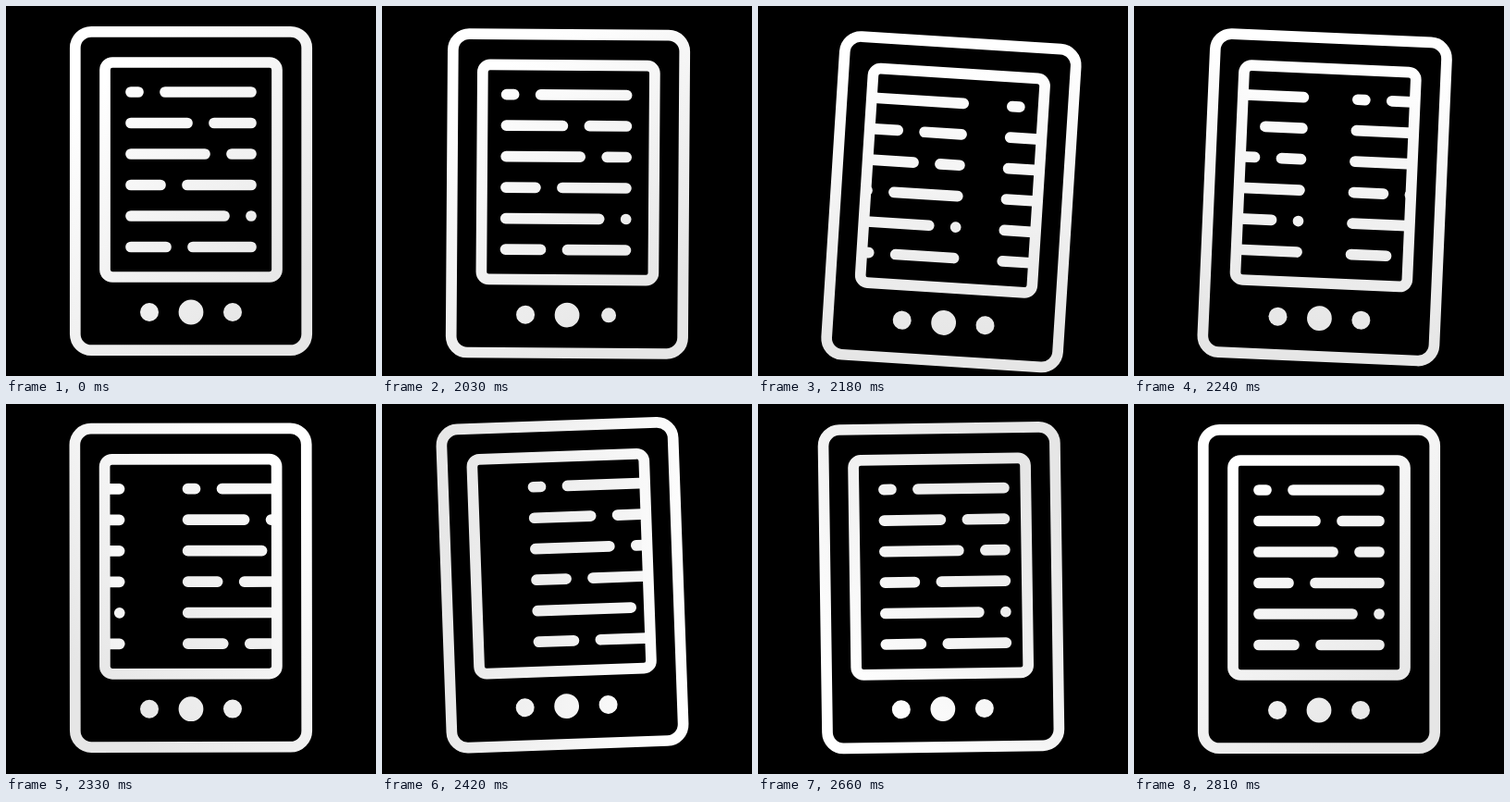
Write an HTML page that moves like this. It is 400 by 400 pixels and loops after 2840 ms.

```html
<!DOCTYPE html>
<html lang="en">
<head>
<meta charset="utf-8">
<title>E-reader page turn</title>
<style>
  html, body { margin: 0; width: 100%; height: 100%; overflow: hidden; background: #000; }
  svg { display: block; width: 100vw; height: 100vh; }
</style>
</head>
<body>
<svg viewBox="0 0 400 400">
  <defs>
    <linearGradient id="shade" gradientUnits="userSpaceOnUse" x1="50" y1="200" x2="350" y2="200">
      <stop offset="0" stop-color="#fff"/>
      <stop offset="1" stop-color="#e6e6e6"/>
    </linearGradient>
    <clipPath id="screen"><rect x="107" y="61" width="186" height="232"/></clipPath>
    <path id="text"/>
  </defs>
  <g id="device" fill="none" stroke="url(#shade)" stroke-width="11.7" stroke-linecap="round">
    <g clip-path="url(#screen)">
      <use id="oldPage" href="#text"/>
      <use id="newPage" href="#text"/>
    </g>
    <rect x="74.8" y="27.8" width="250.4" height="344.4" rx="17.5"/>
    <rect x="107" y="61" width="186" height="232" rx="8"/>
    <g fill="url(#shade)" stroke="none">
      <circle cx="155" cy="331" r="10"/>
      <circle cx="200" cy="331" r="13.4"/>
      <circle id="next" cx="245" cy="331" r="10"/>
    </g>
  </g>
</svg>
<script>
const LOOP = 2840, START = 2030, STEP = 30;
const $ = id => document.getElementById(id);

// Each row: end of its first dash, start of its second.
const rows = [[143, 172], [196, 225], [215, 244], [167, 196], [236, 265], [173, 202]];
$('text').setAttribute('d', rows.map(([a, b], i) => {
  const y = 93 + 33.5 * i;
  return `M135 ${y}H${a}M${b} ${y}H${b === 265 ? 265.01 : 265}`;
}).join(''));

function bezier(x1, x2) {
  // Timing curve whose handles are flat at both ends.
  return p => {
    let lo = 0, hi = 1;
    for (let i = 0; i < 24; i++) {
      const u = (lo + hi) / 2, v = 1 - u;
      if (3 * x1 * u * v * v + 3 * x2 * u * u * v + u * u * u < p) lo = u; else hi = u;
    }
    return lo * lo * (3 - 2 * lo);
  };
}
const smooth = p => p * p * (3 - 2 * p);
const linear = p => p;
const glide = bezier(0.207, 0.277);

function track(keys, ease = smooth) {
  return t => {
    if (t <= keys[0][0]) return keys[0][1];
    for (let i = 1; i < keys.length; i++) {
      const [t0, a] = keys[i - 1], [t1, b] = keys[i];
      if (t < t1) return a + (b - a) * ease((t - t0) / (t1 - t0));
    }
    return keys[keys.length - 1][1];
  };
}

const tilt = track([[2000, 0], [2150, 3.8], [2450, -2.2], [2810, 0]]);
const drop = track([[1990, 0], [2120, 13.5], [2405, -4.4], [2810, 0]]);
const press = track([[1990, 10], [2075, 5.6], [2180, 10]]);
const leave = track([[2000, 0], [2480, -185]]);
const enter = track([[2000, 185], [2810, 0]], glide);
const light = track([[2000, 45], [2120, 70], [2240, 95], [2330, 140], [2570, 270], [2810, 405]], linear);

function draw(now) {
  let t = now % LOOP;
  t = t < START ? 0 : START + Math.floor((t - START) / STEP) * STEP;
  $('device').setAttribute('transform', `translate(0 ${drop(t)}) rotate(${tilt(t)} 200 341)`);
  $('oldPage').setAttribute('transform', `translate(${leave(t)} 0)`);
  $('newPage').setAttribute('transform', `translate(${enter(t)} 0)`);
  $('newPage').setAttribute('visibility', t < START ? 'hidden' : 'visible');
  $('next').setAttribute('r', press(t));
  $('shade').setAttribute('gradientTransform', `rotate(${light(t)} 200 200)`);
}

const begin = performance.now();
function tick() {
  draw(performance.now() - begin);
  requestAnimationFrame(tick);
}
tick();
</script>
</body>
</html>
```
